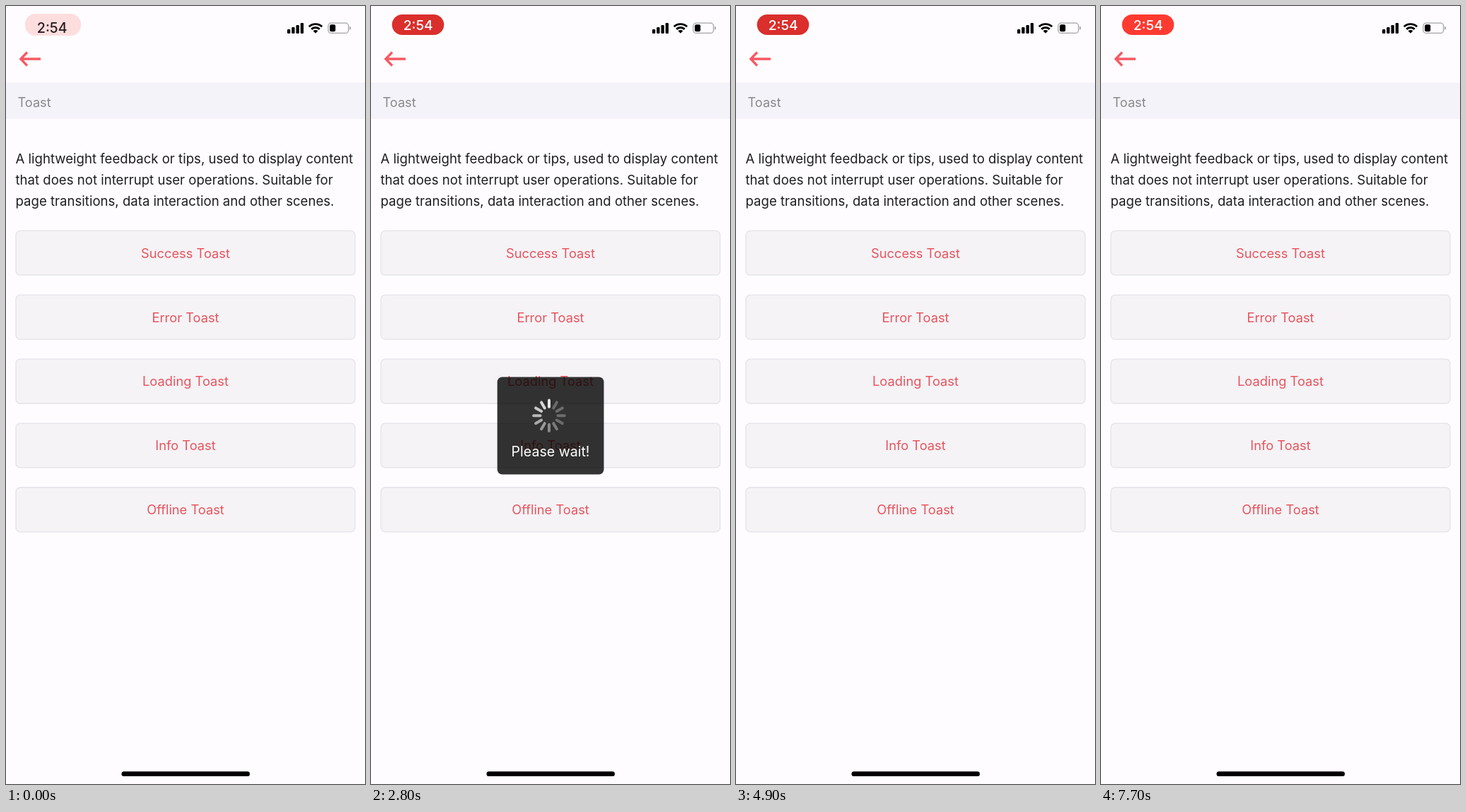
An HTML page with a canvas for the animation above (7.8 s loop, 508 px wide and 1102 px high).

```html
<!DOCTYPE html>
<html lang="en">
<head>
<meta charset="utf-8">
<title>Toast</title>
<style>
  html, body { margin: 0; width: 100%; height: 100%; overflow: hidden; background: #fefcff; }
  canvas { display: block; width: 508px; height: 1102px; }
</style>
</head>
<body>
<canvas id="stage"></canvas>
<script>
const W = 508, H = 1102, LOOP = 7800, STEP = 100;
const RED = '#f75963', INK = '#1e1d20';
const dpr = window.devicePixelRatio || 1;

function setUp(canvas) {
  canvas.width = W * dpr;
  canvas.height = H * dpr;
  const context = canvas.getContext('2d');
  context.scale(dpr, dpr);
  return context;
}

const page = setUp(document.getElementById('stage'));
const layer = setUp(document.createElement('canvas'));
let ctx = page;

const clamp = v => Math.max(0, Math.min(1, v));
const ease = v => { v = clamp(v); return v * v * (3 - 2 * v); };
const mix = (a, b, k) => a + (b - a) * k;

function box(x, y, w, h, r, fill, stroke, line = 1) {
  ctx.beginPath();
  ctx.roundRect(x, y, w, h, r);
  if (fill) { ctx.fillStyle = fill; ctx.fill(); }
  if (stroke) { ctx.strokeStyle = stroke; ctx.lineWidth = line; ctx.stroke(); }
}

function text(str, x, y, size, color, align = 'left', weight = 400) {
  ctx.font = `${weight} ${size}px Inter, sans-serif`;
  ctx.textAlign = align;
  ctx.fillStyle = color;
  ctx.fillText(str, x, y);
}

// Draws on a separate layer, so that overlapping parts fade as one.
function group(alpha, draw) {
  if (alpha <= 0) return;
  ctx = layer;
  ctx.clearRect(0, 0, W, H);
  draw();
  ctx = page;
  ctx.globalAlpha = alpha;
  ctx.drawImage(layer.canvas, 0, 0, W, H);
  ctx.globalAlpha = 1;
}

function drawSignal() {
  for (let i = 0; i < 4; i++) {
    const h = 6 + i * 3;
    box(398 + i * 6.25, 39 - h, 4.3, h, 1.2, '#000');
  }
}

function drawWifi() {
  const cx = 438, cy = 38.8, from = -Math.PI / 2 - 0.77, to = -Math.PI / 2 + 0.77;
  ctx.strokeStyle = ctx.fillStyle = '#000';
  ctx.lineCap = 'butt';
  ctx.lineWidth = 2.9;
  for (const r of [8.3, 13.2]) {
    ctx.beginPath();
    ctx.arc(cx, cy, r, from, to);
    ctx.stroke();
  }
  ctx.beginPath();
  ctx.moveTo(cx, cy);
  ctx.arc(cx, cy, 4.9, from, to);
  ctx.fill();
}

function drawBattery() {
  box(456, 24.2, 28.6, 14.2, 4, null, '#a3a2a5', 1.3);
  box(458.2, 26.3, 8, 10, 2, '#000');
  box(486.2, 28.8, 1.8, 5, [0, 2, 2, 0], '#a3a2a5');
}

function drawArrow() {
  ctx.strokeStyle = RED;
  ctx.lineWidth = 3.3;
  ctx.lineCap = 'butt';
  ctx.lineJoin = 'miter';
  ctx.beginPath();
  ctx.moveTo(49, 75);
  ctx.lineTo(21, 75);
  ctx.moveTo(30, 65.5);
  ctx.lineTo(20.8, 75);
  ctx.lineTo(30, 84.5);
  ctx.stroke();
}

function drawPage() {
  ctx.fillStyle = '#fefcff';
  ctx.fillRect(0, 0, W, H);
  drawSignal();
  drawWifi();
  drawBattery();
  drawArrow();

  ctx.fillStyle = '#f5f3fa';
  ctx.fillRect(0, 108.5, W, 51.5);
  text('Toast', 16.5, 143, 18.2, '#89888b');

  [
    'A lightweight feedback or tips, used to display content',
    'that does not interrupt user operations. Suitable for',
    'page transitions, data interaction and other scenes.'
  ].forEach((line, i) => text(line, 13.5, 222.7 + i * 30, 18.6, INK));

  ['Success', 'Error', 'Loading', 'Info', 'Offline'].forEach((name, i) => {
    const y = 318.4 + i * 90.9;
    box(14, y, 480, 62.8, 6, '#f5f3f6', '#e4e3e7', 1.3);
    text(name + ' Toast', 254, y + 38.2, 18.3, '#e8545e', 'center');
  });

  box(163.5, 1084.3, 181.5, 6.8, 3.4, '#000');
}

// The clock turns into a pulsing red capsule.
function drawClock(t) {
  const wave = 0.5 - 0.5 * Math.cos((t - 1080) / 1850 * 2 * Math.PI);
  const glow = clamp(wave * 1.25);
  const rgb = [mix(216, 255, glow), mix(46, 58, glow), mix(44, 49, glow)].map(Math.round);
  const grow = 1 - ease(t / 400);
  group(mix(0.06, 1, ease((t + 90) / 460)), () =>
    box(29.7 - 2.7 * grow, 12 - grow, 73.6 + 5.4 * grow, 29 + 2 * grow, 14.5, `rgb(${rgb})`));

  const shown = ease(t / 300);
  const x = mix(65.2, 66.7, shown), y = mix(38, 33.6, shown);
  group(1 - shown, () => text('2:54', x, y, 19.6, '#2a1c1f', 'center', 500));
  group(shown, () => text('2:54', x, y, 19.3, '#fff', 'center', 500));
}

function drawSpinner(t) {
  const head = Math.floor(t * 12 / 1000) + 3;
  ctx.lineWidth = 4;
  ctx.lineCap = 'round';
  for (let i = 0; i < 12; i++) {
    const age = ((head - i) % 12 + 12) % 12;
    const angle = i * Math.PI / 6 - Math.PI / 2;
    const c = Math.cos(angle), s = Math.sin(angle);
    ctx.strokeStyle = `rgba(255,255,255,${Math.max(0.28, 0.88 - age * 0.075)})`;
    ctx.beginPath();
    ctx.moveTo(252 + 12.5 * c, 580.3 + 12.5 * s);
    ctx.lineTo(252 + 21.8 * c, 580.3 + 21.8 * s);
    ctx.stroke();
  }
}

const FADE = 200;
const fade = (t, start, hold) =>
  ease((t - start) / FADE) * (1 - ease((t - start - FADE - hold) / FADE));

function drawToasts(t) {
  group(fade(t, 2459, 2000), () => {
    box(178.7, 525.5, 150.8, 138, 7, 'rgba(0,0,0,0.8)');
    text('Please wait!', 254, 638.3, 19.6, '#fff', 'center');
    drawSpinner(t);
  });
  group(fade(t, 5725, 1000), () => {
    box(121, 570, 266, 49, 4, 'rgba(0,0,0,0.8)');
    text('You account ID is 69014', 254, 601.8, 19.6, '#fff', 'center');
  });
}

function render() {
  const t = Math.floor(performance.now() % LOOP / STEP) * STEP;
  drawPage();
  drawClock(t);
  drawToasts(t);
  requestAnimationFrame(render);
}
render();
</script>
</body>
</html>
```
